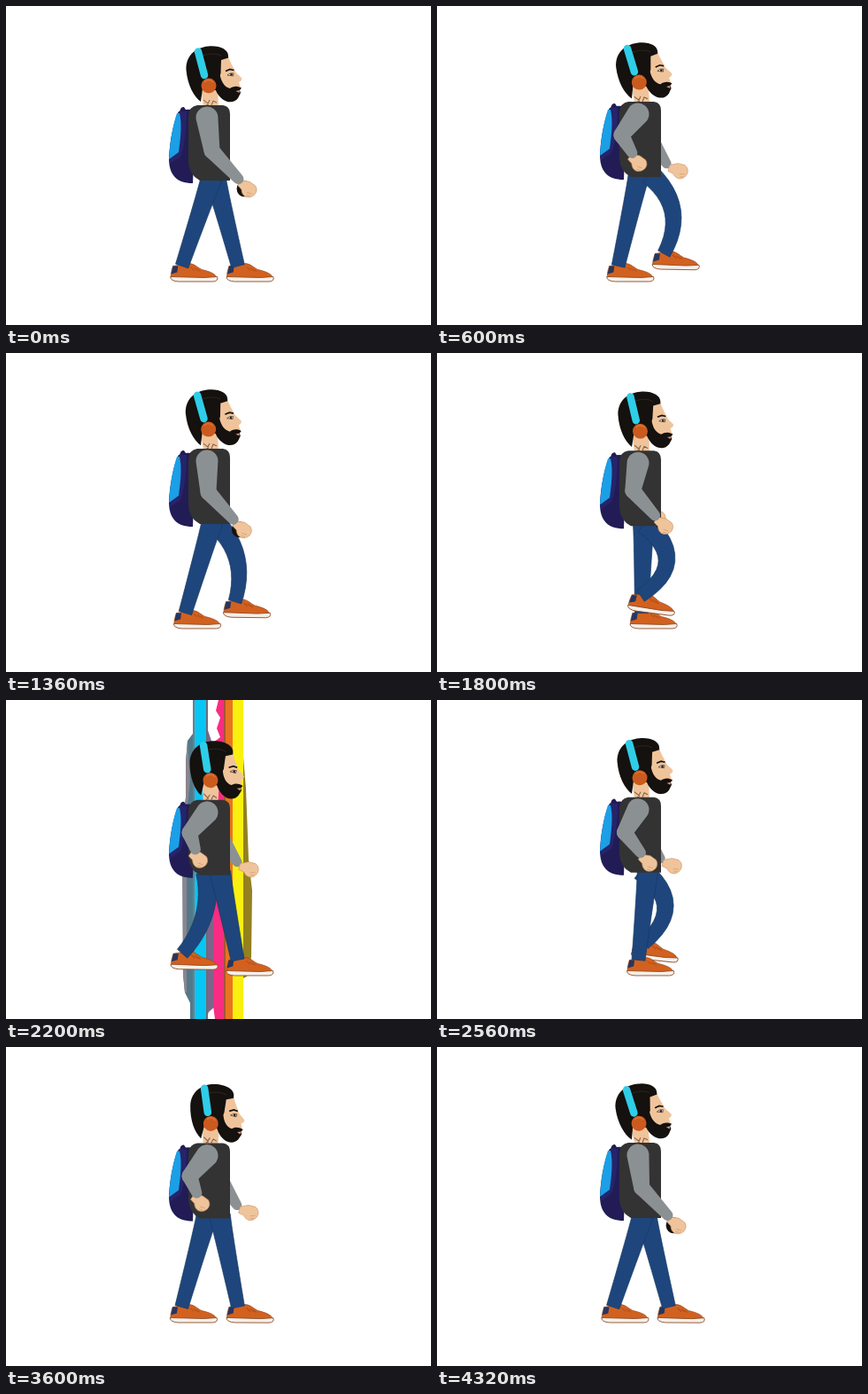
Write an HTML page with a canvas that moves like this. It is 480 by 360 pixels and loops after 4360 ms.

```html
<!DOCTYPE html>
<html lang="en">
<head>
<meta charset="utf-8">
<title>Walk</title>
<style>
  html, body { margin: 0; width: 100%; height: 100%; overflow: hidden; background: #fff; }
  canvas { display: block; width: 100vw; height: 100vh; }
</style>
</head>
<body>
<canvas id="stage"></canvas>
<script>
const LOOP = 4360, STEP = 40, STRIDES = 3, NODS = 9;
const canvas = document.getElementById('stage');
const ctx = canvas.getContext('2d');
const ratio = Math.max(1, window.devicePixelRatio || 1);
canvas.width = 480 * ratio;
canvas.height = 360 * ratio;

const C = {
  jeans: '#1e467c', seam: '#183862', shirt: '#333333', sleeve: '#8b9093',
  skin: '#f0c49b', hair: '#14110e', shoe: '#d2611f', pack: '#211c55',
  packMid: '#26246a', packLight: '#1b9fe6', band: '#2fcde8', cup: '#cb5a1f'
};

// Keys are [phase, value] pairs over one cycle.
const BOB = [[0, 0], [.02, .6], [.08, 2.5], [.2, 2.2], [.5, -2], [.65, -4], [.945, -4], [.96, -3], [1, 0]];
const NOD = [[0, 0], [.05, -2.5], [.11, -5], [.24, -2], [.43, 7], [.54, 6], [.81, -1], [.92, -3], [1, 0]];
const FOOT_X = [[0, 249], [.04, 248], [.41, 192], [.48, 185], [.54, 187], [.91, 243], [.97, 249], [1, 249]];
const FOOT_LIFT = [[0, 0], [.5, 0], [.51, 7], [.54, 8.5], [.72, 20], [.91, 14], [.935, 13], [.97, 0], [1, 0]];
const FOOT_TILT = [[0, 0], [.5, 0], [.54, 2], [.66, 13], [.82, 2], [1, 0]];

const frac = v => v - Math.floor(v);
const lerp = (a, b, k) => a + (b - a) * k;
const mix = (a, b, k) => [lerp(a[0], b[0], k), lerp(a[1], b[1], k)];
const easeOut = k => Math.sin(k * Math.PI / 2);

function sample(keys, phase) {
  const p = frac(phase);
  const i = Math.max(1, keys.findIndex(k => k[0] >= p));
  const [a, b] = [keys[i - 1], keys[i]];
  return lerp(a[1], b[1], (p - a[0]) / (b[0] - a[0]));
}

function shape(d, fill, stroke, width = 1) {
  const path = new Path2D(d);
  if (fill) { ctx.fillStyle = fill; ctx.fill(path); }
  if (stroke) { ctx.strokeStyle = stroke; ctx.lineWidth = width; ctx.stroke(path); }
}

function oval(x, y, rx, ry, fill) {
  ctx.beginPath();
  ctx.ellipse(x, y, rx, ry, 0, 0, Math.PI * 2);
  ctx.fillStyle = fill;
  ctx.fill();
}

// Tapered limb segment with round ends.
function taper(a, ra, b, rb, fill) {
  const dir = Math.atan2(b[1] - a[1], b[0] - a[0]), q = Math.PI / 2;
  ctx.beginPath();
  ctx.arc(a[0], a[1], ra, dir + q, dir - q);
  ctx.arc(b[0], b[1], rb, dir - q, dir + q);
  ctx.closePath();
  ctx.fillStyle = fill;
  ctx.fill();
}

// Curved trouser leg running through the knee.
function trouser(hip, knee, ankle) {
  const mid = mix(hip, ankle, .5);
  const bend = [2 * knee[0] - mid[0], 2 * knee[1] - mid[1]];
  const left = [], right = [];
  for (let i = 0; i <= 12; i++) {
    const k = i / 12;
    const a = mix(hip, bend, k), b = mix(bend, ankle, k), p = mix(a, b, k);
    const len = Math.hypot(b[0] - a[0], b[1] - a[1]) || 1;
    const r = lerp(12, 7.5, Math.pow(k, .75));
    const nx = -(b[1] - a[1]) / len * r, ny = (b[0] - a[0]) / len * r;
    left.push([p[0] + nx, p[1] + ny]);
    right.unshift([p[0] - nx, p[1] - ny]);
  }
  ctx.beginPath();
  left.concat(right).forEach(p => ctx.lineTo(p[0], p[1]));
  ctx.closePath();
  ctx.fillStyle = C.jeans;
  ctx.fill();
  ctx.strokeStyle = C.seam;
  ctx.lineWidth = .7;
  ctx.stroke();
}

function shoe(x, y, tilt) {
  ctx.save();
  ctx.translate(x + 12, y - 17);
  ctx.rotate(tilt);
  ctx.translate(-12, 17);
  ctx.scale(.96, 1);
  shape('M3 -18C1 -12 0 -8 1 -4L54 -4C55 -9 46 -12 37 -14C31 -17 29 -20 23 -21L9 -19Z', C.shoe, '#9a4519', .7);
  shape('M3 -18L9 -18L8 -11L1 -9Z', '#26365f');
  shape('M0 -6L40 -5L55 -6Q57 -1 50 -.5L10 -.5Q0 -1 0 -6Z', '#f6efe8', '#8a4a24', .9);
  shape('M24 -17L28 -13M28 -16L32 -13M32 -14.5L35 -12', null, '#a84a18', 1);
  ctx.restore();
}

function leg(phase, hip) {
  const x = sample(FOOT_X, phase);
  const y = 311.5 - sample(FOOT_LIFT, phase);
  const tilt = sample(FOOT_TILT, phase) * Math.PI / 180;
  const ankle = [x + 13, y - 18];
  const dx = ankle[0] - hip[0], dy = ankle[1] - hip[1], d = Math.hypot(dx, dy);
  const bulge = Math.sqrt(Math.max(0, 49 ** 2 - d * d / 4));
  const knee = [hip[0] + dx / 2 + dy / d * bulge, hip[1] + dy / 2 - dx / d * bulge];
  shoe(x, y, tilt);
  trouser(hip, knee, ankle);
}

function fist(x, y, turn) {
  ctx.save();
  ctx.translate(x, y);
  ctx.rotate(turn);
  shape('M-11 -5L-2 -8L6 -7Q11 -4 10 2Q8 8 2 9Q-3 9 -6 4L-12 2Z', C.skin, '#c9935f', .6);
  shape('M1 4L7 3M2 7L6 6', null, '#d09c70', .7);
  ctx.restore();
}

function farArm(swing) {
  const k = easeOut((1 - swing) / 2);
  const hand = mix([225, 185], [276, 190], k);
  const wrist = [hand[0] - 15, hand[1] - 8];
  taper([hand[0] - 32, hand[1] - 34], 9, wrist, 5.5, C.sleeve);
  fist(hand[0] - 1, hand[1], .12);
}

function nearArm(swing) {
  const k = (1 - swing) / 2;
  const elbow = mix([233.5, 164], [207.5, 149], easeOut(k));
  const hand = mix([274.5, 207], [217, 179], k);
  hand[1] -= 6 * k * (1 - k) * 4 * k;
  const wrist = mix(elbow, hand, lerp(.74, .62, k));
  const grip = Math.min(1, swing * 1.4);
  if (grip > 0) oval(hand[0] - 4, hand[1], 8.5 * grip, 9 * grip, '#17130f');
  fist(hand[0], hand[1], .5);
  taper([227, 126], 12.5, elbow, 9, C.sleeve);
  taper(elbow, 9, wrist, 6, C.sleeve);
}

function backpack() {
  shape('M196 120Q197 113 201 114L205 120Z', C.pack);
  shape('M195 119C190 128 185 150 184 172C184 190 192 200 211 200L214 118Q204 115 195 119Z', C.pack);
  shape('M196 119L204 119C204 142 201 160 197 170L185 178L185 168Z', C.packMid);
  shape('M193 121C189 133 185 152 184 173L195 165C197 150 199 133 196 121Z', C.packLight);
}

function torso() {
  shape('M216 112L245 112Q253 113 253 122L253 197L219 197Q207 191 206 176L206 124Q207 113 216 112Z', C.shirt);
}

function head(turn) {
  ctx.save();
  ctx.translate(232, 109);
  ctx.rotate(turn);
  ctx.translate(-232, -109);
  shape('M220 94L239 92L240 113L223 113Z', C.skin);
  shape('M223 106L228 110L230 106M232 112L234 107L238 109M226 112L229 111', null, '#7d5c45', 1);
  shape('M239 60L251 57C253 63 256 68 258 72C259 76 265 79 266.5 82Q266 85 263 86L265 92L262 99L244 99L236 84Z', C.skin);
  shape('M203.5 72C203 56 214 47 228 45.5C241 44 251 49 251 56L251 58.5L243 61L242.5 76L239 85L237 95L222 93L220 108C212 102 205 89 203.5 72Z', C.hair);
  shape('M241.5 77C243 86 247 91.5 253 93C256 91 260 89.5 266 92.5L264 95L265 98L262 104C259 108 255 109 250 108C244 106 239 101 236 93L238 83Z', C.hair);
  shape('M259.5 96L264 95L263.5 98Z', '#d9917c');
  shape('M248 73.5L253 71.5L257.5 72.5', null, C.hair, 1.7);
  shape('M250 78Q253 75 257 76L256.5 79Z', '#fff', '#37251b', .7);
  oval(254.5, 77.4, 1.4, 1.4, '#37251b');
  shape('M222 56Q234 52 243 56', null, '#3a2d24', .7);
  ctx.lineCap = 'round';
  shape('M217 51.5L224 78', null, C.band, 8.5);
  ctx.lineCap = 'butt';
  oval(229, 90, 8.5, 8.5, C.cup);
  shape('M224 86Q229 81 234 86', null, '#df7635', 1.2);
  ctx.restore();
}

function stripes() {
  const bars = [
    [211, 2, '#777b80'], [213, 13, '#06c6f5'], [226, 2, '#6e6a76'],
    [246, 10, '#e87420'], [246, 2, '#a85537'], [256, 12, '#faf010']
  ];
  shape('M211 38L205 46L203 70L203 110L199 140L200 310L202 330L208 342L208 360L214 360L214 38Z', '#52798a');
  shape('M205 46L203 70L203 110L199 140L200 310L202 330L204 330L204 130L208 90Z', '#8b858f');
  shape('M226 28L232 46L236 110L236 346L229 352L226 360Z', '#7d6589');
  for (const [x, w, fill] of bars) {
    ctx.fillStyle = fill;
    ctx.fillRect(x, 0, w, 360);
  }
  shape('M240 0L246 0L246 360L236 360L234 345L234 48L242 42L238 32L242 20L237 12Z', '#f82c82');
  shape('M268 64L271 100L274 180L278 215L277 290L272 312L268 314Z', '#94801f');
}

function burst(t) {
  const upright = (t >= 1000 && t < 1240) || (t >= 2040 && t < 2360);
  const level = t >= 3040 && t < 3280;
  if (!upright && !level) return;
  ctx.save();
  if (level) {
    ctx.translate(240, 180);
    ctx.rotate(Math.PI / 2);
    ctx.scale(1, 480 / 360);
    ctx.translate(-240, -180);
  }
  stripes();
  ctx.restore();
}

function draw(t) {
  const walk = t / LOOP * STRIDES;
  const swing = Math.cos((walk - .05) * Math.PI * 2);
  const bob = sample(BOB, walk * 2);
  const nod = sample(NOD, t / LOOP * NODS) * Math.PI / 180;

  ctx.setTransform(ratio, 0, 0, ratio, 0, 0);
  ctx.fillStyle = '#fff';
  ctx.fillRect(0, 0, 480, 360);
  burst(t);

  // The hips twist against the arms.
  leg(walk, [231.5 + 5 * swing, 194 + bob]);
  leg(walk - .5, [237 - 5 * swing, 194 + bob]);
  ctx.save();
  ctx.translate(0, bob);
  farArm(swing);
  backpack();
  head(nod);
  torso();
  nearArm(swing);
  ctx.restore();
}

const start = performance.now();
function tick() {
  const t = (performance.now() - start) % LOOP;
  draw(Math.floor(t / STEP) * STEP);
  requestAnimationFrame(tick);
}
tick();
</script>
</body>
</html>
```
